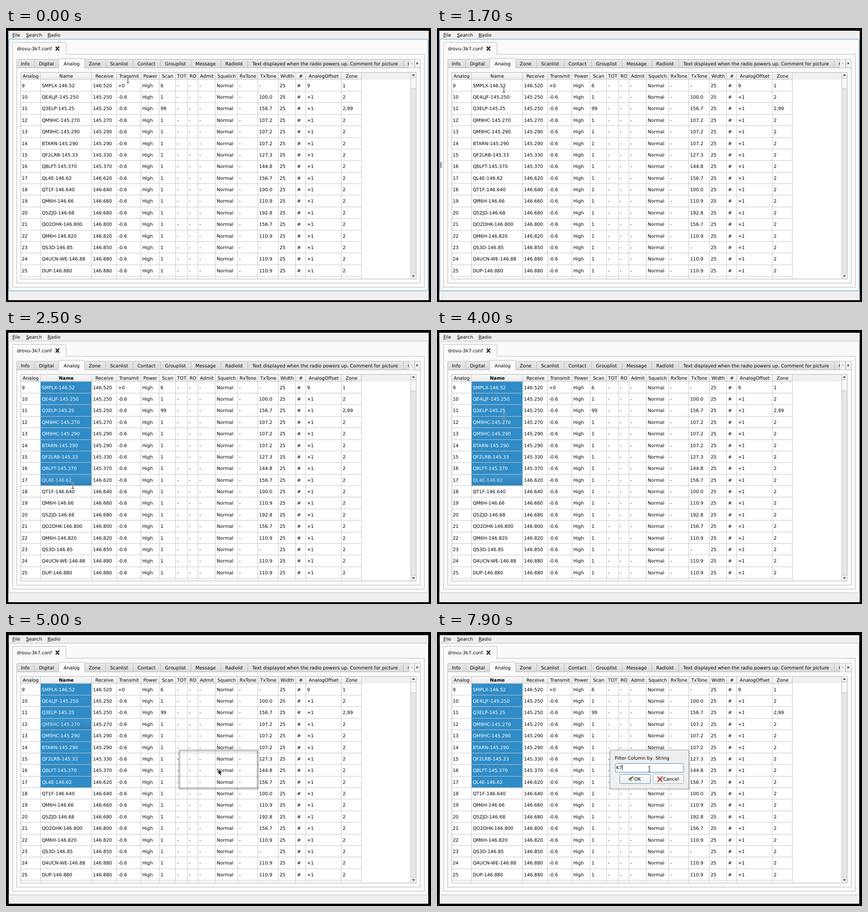
Recreate the animation shown at these times as an HTML page. Size 931x601 px, loop 8 s.

```html
<!DOCTYPE html>
<html lang="en">
<head>
<meta charset="utf-8">
<title>Channel editor</title>
<style>
  html, body { margin: 0; width: 100%; height: 100%; overflow: hidden; background: #000; }
  svg { display: block; }
  text {
    font: 10.15px "DejaVu Sans", sans-serif;
    white-space: pre;
    text-rendering: geometricPrecision;
  }
</style>
</head>
<body>
<svg id="stage" width="931" height="601" viewBox="0 0 931 601"></svg>
<script>
const LOOP = 8000, TICK = 100;
const TOP = 113.3, ROW = 25.375;
const BLUE = '#308cc6', EDGE = '#b9b9b9', PANE = '#fafafa';

const cols = [32, 76, 188, 243, 296, 336, 372, 398, 421, 459, 508, 552, 597, 635, 657, 735, 779];
const heads = 'Analog Name Receive Transmit Power Scan TOT RO Admit Squelch RxTone TxTone Width # AnalogOffset Zone'.split(' ');
const channels = [
  'SMPLX-146.52 -', 'QE4LJF-145.250 100.0', 'Q3ELP-145.25 156.7', 'QM9HC-145.270 107.2',
  'QM9HC-145.290 107.2', 'BTARN-145.290 107.2', 'QF2LRB-145.33 127.3', 'Q8LFT-145.370 144.8',
  'QL4E-146.62 156.7', 'QT1F-146.640 100.0', 'QM6H-146.66 110.9', 'Q5ZJD-146.68 192.8',
  'QO2DHK-146.800 156.7', 'QM6H-146.820 110.9', 'QS3D-146.85 -', 'Q4UCN-WE-146.88 110.9',
  'DUP-146.880 110.9'
].map(s => s.split(' '));
const tabs = [['Info', 23], ['Digital', 62], ['Analog', 116], ['Zone', 171], ['Scanlist', 218],
  ['Contact', 278], ['Grouplist', 338], ['Message', 405], ['RadioId', 470],
  ['Text displayed when the radio powers up. Comment for picture', 529], ['', 870], ['', 930]];
const menuItems = ['_Filter Row by', 'Dup_licate Row', '_Delete Row', '_Sort Rows', '_Remove value', '_Add value'];

// Markup helpers: an underscore marks the underlined letter of a label.
const rect = (x, y, w, h, fill, more = '') =>
  `<rect x="${x}" y="${y}" width="${w}" height="${h}" fill="${fill}" ${more}/>`;
const box = (x, y, w, h, fill, stroke = EDGE, r = 0, more = '') =>
  rect(x + .5, y + .5, w - 1, h - 1, fill, `stroke="${stroke}" rx="${r}" ${more}`);
const path = (d, more) => `<path d="${d}" ${more}/>`;
const text = (x, cy, str, more = '') =>
  `<text x="${x}" y="${cy + 3.7}" ${more}>` +
  str.replace(/_(.)/, '<tspan text-decoration="underline">$1</tspan>') + '</text>';
const mid = (x, cy, str, more = '') => text(x, cy, str, 'text-anchor="middle" ' + more);
const group = (id, inner, more = '') => `<g id="${id}" ${more}>${inner}</g>`;
const grad = (id, a, b) => `<linearGradient id="${id}" x2="0" y2="1"><stop stop-color="${a}"/>` +
  `<stop offset="1" stop-color="${b}"/></linearGradient>`;

function defs() {
  return '<defs>' + grad('tabFill', '#e9e9e9', '#d9d9d9') + grad('headFill', '#f8f8f8', '#ebebeb') +
    grad('btnFill', '#fbfbfb', '#ececec') + grad('hoverFill', '#3b94cb', '#2c83ba') +
    '<filter id="blur" x="-10%" y="-10%" width="120%" height="120%"><feGaussianBlur stdDeviation="1.6"/></filter>' +
    '<clipPath id="tabClip"><rect x="20" y="60" width="862" height="30"/></clipPath></defs>';
}

function frame() {
  let s = rect(5, 6, 921, 591, '#efefef');
  s += text(14, 15, '_File') + text(44, 15, '_Search') + text(91, 15, '_Radio');
  s += box(6, 24, 919, 553, PANE, EDGE, 2, 'id="outer"');
  s += box(14, 57, 903, 512, PANE);
  s += path('M14.5 58V33.5Q14.5 31.5 16.5 31.5H129.5Q131.5 31.5 131.5 33.5V58', `fill="${PANE}" stroke="${EDGE}"`);
  s += text(24, 45, 'drovu-3k7.conf');
  s += path('M109 41L116.5 49.5M116.5 40.5L109 49.5', 'stroke="#000" stroke-width="2"');
  for (let i = 0; i < 9; i++) {
    const a = i % 3, b = Math.floor(i / 3);
    if (a + b > 1) s += rect(916 + a * 3, 587 + b * 3, 1, 1, '#cfcfcf');
  }
  return s;
}

function tabBar() {
  const shape = (a, b, y, fill) => path(
    `M${a + .5} 88V${y + 2}Q${a + .5} ${y} ${a + 2.5} ${y}H${b - 1.5}Q${b + .5} ${y} ${b + .5} ${y + 2}V88`,
    `fill="${fill}" stroke="${EDGE}"`);
  let s = '';
  tabs.slice(0, -1).forEach(([name, x], i) => {
    const end = tabs[i + 1][1];
    s += shape(x, end, 68.5, 'url(#tabFill)');
    if (i !== 2) s += mid((x + end) / 2 - .3, 78, name);
  });
  s = `<g clip-path="url(#tabClip)">${s}${text(880, 78, 'C')}</g>`;
  s += box(23, 87, 885, 473, PANE);
  s += shape(115, 172, 66.5, PANE) + mid(143.7, 78, 'Analog');
  s += box(882, 68, 13, 20, '#f1f1f1', '#cccccc') + box(895, 68, 13, 20, 'url(#btnFill)');
  s += path('M890 74.5V80.5L886.5 77.5Z', 'fill="#c4c4c4"');
  return s + path('M899.5 74.5V80.5L903 77.5Z', 'fill="#222"');
}

function cells(i) {
  const [name, tone] = channels[i], first = i === 0, odd = i === 2;
  const freq = Number(name.split('-').pop()).toFixed(3);
  const row = [String(9 + i), name, freq, first ? '+0' : '-0.6', 'High', first ? '6' : odd ? '99' : '1',
    '-', '-', '-', 'Normal', '-', tone, '25', '#', first ? '9' : '+1', first ? '1' : odd ? '2,99' : '2'];
  return row.map((v, c) =>
    text(cols[c] + 2.4, 126 + ROW * i, v, c === 1 ? `id="name${i}"` : '')).join('');
}

function table() {
  let s = rect(32, 97, 867, 454, '#fff') + rect(32, 97, 854, 16, '#f0f0f0') + rect(32, 97, 747, 16, 'url(#headFill)');
  channels.forEach((_, i) => {
    s += rect(76, TOP + ROW * i, 111.5, ROW, BLUE, `id="cell${i}"`);
  });
  let grid = '';
  cols.slice(1).forEach(x => { grid += `M${x - .5} 97V550`; });
  channels.forEach((_, i) => { grid += `M32 ${Math.round(138 + ROW * i) + .5}H779`; });
  s += path(grid, 'stroke="#c6c6c6" fill="none"') + path('M32 112.5H779', 'stroke="#bdbdbd"');
  heads.forEach((h, c) => {
    s += mid((cols[c] + cols[c + 1]) / 2, 105, h, c === 1 ? 'id="nameHead"' : '');
  });
  channels.forEach((_, i) => { s += cells(i); });
  s += box(886, 97, 13, 454, '#e6e6e6', '#c4c4c4');
  s += box(886, 97, 13, 13, 'url(#btnFill)', '#c4c4c4') + box(886, 538, 13, 13, 'url(#btnFill)', '#c4c4c4');
  s += box(886, 109, 13, 25, '#f8f8f8');
  s += path('M889 104.5H896L892.5 101ZM889 542.5H896L892.5 546Z', 'fill="#333"');
  return s + box(32, 97, 867, 454, 'none', '#b4b4b4');
}

function menu() {
  let s = rect(150, 192, 175, 116, '#000', 'opacity=".4" filter="url(#blur)"');
  s += box(148, 190, 175, 116, '#fcfcfc', '#9c9c9c') + rect(149, 190.5, 173, 18.5, BLUE);
  menuItems.forEach((m, i) => {
    s += text(170.5, 199.3 + 19.5 * i, m, i ? '' : 'fill="#fff"');
  });
  return s + text(278, 199.3, 'Ctrl+F', 'fill="#fff"');
}

function dialog() {
  let s = rect(380, 260, 171, 83, '#efefef') + text(389.5, 276, 'Filter Column by  String');
  s += box(390, 288, 151, 20, '#fff', BLUE, 2);
  s += text(392.6, 297.5, '', 'id="entry"') + rect(393, 291, 1, 13, '#000', 'id="caret"');
  s += box(400, 312, 68, 21, 'url(#btnFill)', '#4a8fbd', 2) + box(473, 312, 68, 21, 'url(#btnFill)', '#b4b4b4', 2);
  s += path('M419 323L424 319L431 317L427 323L424 327Z', 'fill="#6d8a5c" stroke="#46573d" stroke-width=".8"');
  s += path('M420 322.5L423.5 326L430 318.5', 'fill="none" stroke="#9cb48a" stroke-width="1.2"');
  s += text(432, 322.7, 'OK');
  s += path('M484 318L493 327.5M493.5 317.5L484 328', 'stroke="#b3202a" stroke-width="2.2" stroke-linecap="round"');
  return s + text(495.5, 322.7, 'Cancel');
}

function pointers() {
  const beam = 'M-3 -6.3Q0 -6.3 0 -4.8Q0 -6.3 3 -6.3M0 -4.8V4.8M-3 6.3Q0 6.3 0 4.8Q0 6.3 3 6.3';
  const arrow = 'M0 0V12L2.8 9.5L5 14.2L7 13.2L4.9 8.8H8.6Z';
  return group('beam', path(beam, 'fill="none" stroke="#fff" stroke-width="2.4"') +
    path(beam, 'fill="none" stroke="#222" stroke-width="1.1"')) +
    group('arrow', path(arrow, 'fill="#000" stroke="#fff" stroke-width=".9"'));
}

document.getElementById('stage').innerHTML = defs() + frame() + tabBar() + table() +
  rect(8, 294, 1.3, 13, '#222', 'id="paneCaret"') +
  box(5, 6, 921, 591, 'none', '#0a0a0a', 0, 'id="inactive"') +
  group('menu', menu()) +
  rect(379.5, 260, 172, 83.5, 'none', 'id="shadow" stroke="#000" stroke-width="3" opacity=".35" filter="url(#blur)"') +
  group('dialog', dialog()) + pointers();

const $ = id => document.getElementById(id);
const show = (id, on) => $(id).setAttribute('visibility', on ? 'visible' : 'hidden');
const within = (t, ...spans) => spans.some(([a, b]) => t >= a && t < b);

// Pointer path: time, x, y
const track = [
  [0, 267, 114], [100, 201, 103], [200, 201, 103], [300, 210.5, 105], [500, 210.5, 105],
  [1000, 178, 337], [1400, 150, 190], [1700, 146.5, 135], [1800, 146.5, 165], [2000, 146.5, 268],
  [2300, 146.5, 322], [2500, 146.5, 341.5], [3900, 146.5, 341.5], [4000, 147, 189], [4100, 147, 189],
  [4200, 152, 189], [4300, 152, 189], [4600, 176, 198], [4900, 176, 198], [5000, 465, 301], [LOOP, 465, 301]
];

function pointer(t) {
  const k = track.findIndex(p => p[0] > t);
  const [t0, x0, y0] = track[k - 1], [t1, x1, y1] = track[k];
  const u = (t - t0) / (t1 - t0);
  return [x0 + (x1 - x0) * u, y0 + (y1 - y0) * u];
}

function draw(t) {
  const [x, y] = pointer(t);
  const picked = t >= 1800;
  const under = Math.min(8, Math.floor((y - TOP) / ROW));
  const last = t < 2500 ? under : 8;
  const hover = t < 2500 ? under : t < 4200 ? 8 : t < 5100 ? 3 : -1;

  channels.forEach((_, i) => {
    const on = picked && i <= last, hot = on && i === hover;
    show('cell' + i, on);
    $('cell' + i).setAttribute('fill', hot ? 'url(#hoverFill)' : BLUE);
    $('name' + i).setAttribute('fill', hot ? '#dcebf5' : on ? '#fff' : '#000');
  });
  $('nameHead').style.fontWeight = picked ? 'bold' : 'normal';
  $('outer').setAttribute('stroke', picked ? EDGE : '#4a9ccc');
  show('paneCaret', within(t, [300, 800], [1300, 1800]));

  $('menu').setAttribute('opacity', t < 4300 ? .6 : t < 4700 ? 1 : .4);
  show('menu', within(t, [4200, 4800]));
  show('inactive', t >= 5000);
  show('shadow', t >= 5000);

  const open = t >= 5100, typed = t >= 7900 ? 'K7' : t >= 6600 ? 'K' : '';
  show('dialog', open);
  $('entry').textContent = typed;
  $('caret').setAttribute('x', 393 + 6.3 * typed.length);
  // An inherited value keeps the caret hidden along with the dialog.
  $('caret').setAttribute('visibility',
    within(t, [5100, 5500], [5900, 6400], [6600, 7200], [7700, LOOP]) ? 'inherit' : 'hidden');

  const arrow = within(t, [4200, 5100]);
  show('arrow', arrow);
  show('beam', !arrow);
  $(arrow ? 'arrow' : 'beam').setAttribute('transform', `translate(${x} ${y})`);
}

function tick() {
  draw(Math.floor(performance.now() % LOOP / TICK) * TICK);
  requestAnimationFrame(tick);
}
tick();
</script>
</body>
</html>
```
